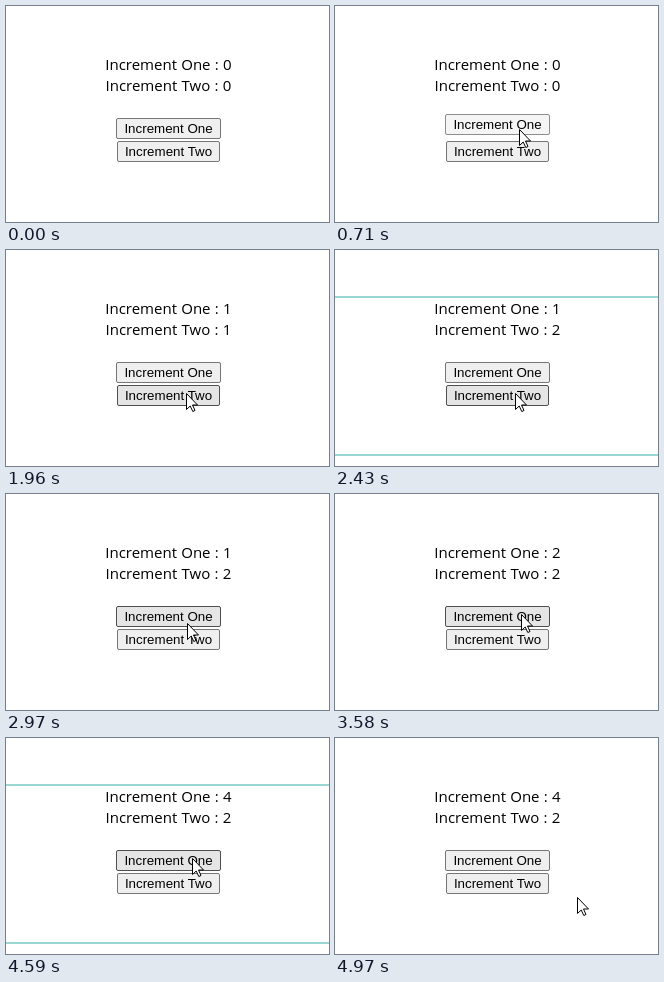
An HTML page that plays this animation: 323x216 px, repeating every 5.05 s.

```html
<!DOCTYPE html>
<html lang="en">
<head>
<meta charset="utf-8">
<title>Increment counters</title>
<style>
  html, body { margin: 0; width: 100%; height: 100%; overflow: hidden; background: #fff; }
  svg { display: block; width: 323px; height: 216px; }
  text { text-anchor: middle; fill: #000; }
  .label { font: 15px "Open Sans", "Noto Sans", sans-serif; word-spacing: .4px; }
  .button text { font: 13.333px "Liberation Sans", Arial, sans-serif; }
  .button rect { fill: #efefef; stroke: #767676; }
  .button.hover rect { fill: #e5e5e5; stroke: #4f4f4f; }
  .button.press rect { fill: #f5f5f5; stroke: #8d8d8d; }
  .button.press { transform: translateY(-4px); }
  #flash { fill: #37afa9; fill-opacity: .5; }
  #cursor { fill: #fff; stroke: #000; }
</style>
</head>
<body>
<svg viewBox="0 0 323 216">
  <text class="label" x="162.5" y="64">Increment One : 0</text>
  <text class="label" x="162.5" y="85">Increment Two : 0</text>
  <g class="button">
    <rect x="110.5" y="112.5" width="104" height="20" rx="1.5"/>
    <text x="162.5" y="127">Increment One</text>
  </g>
  <g class="button">
    <rect x="111.5" y="135.5" width="102" height="20" rx="1.5"/>
    <text x="162.5" y="150">Increment Two</text>
  </g>
  <path id="flash" d="M0 46H323V48H0ZM0 204H323V206H0Z"/>
  <path id="cursor" d="M.5 .5V16.5L4.2 13 6.8 18.5 9 17.5 6.5 12H11.5Z"/>
</svg>
<script>
const LOOP = 5050, STEP = 75, PRESS = 170, FLASH = 230;
const names = ['One', 'Two'];

// The pointer starts below the stage and glides to each stop in turn
const home = { x: 240, y: 221 };
const glides = [
  { at: 80, steps: 7, x: 184, y: 123 },
  { at: 1180, steps: 3, x: 180, y: 141 },
  { at: 1480, steps: 1, x: 180, y: 143 },
  { at: 2810, steps: 3, x: 181, y: 129 },
  { at: 3040, steps: 4, x: 186, y: 120 },
  { at: 4820, steps: 3, x: 242, y: 159 }
];

// Release times for each button
const clicks = [[780, 3350, 3960, 4590], [1730, 2430]];

const labels = document.querySelectorAll('.label');
const buttons = document.querySelectorAll('.button');
const flash = document.getElementById('flash');
const cursor = document.getElementById('cursor');

const easeOut = u => 1 - (1 - u) ** 2;
const mix = (a, b, p) => Math.round(a + (b - a) * p);

function pointer(t) {
  let pos = home;
  for (const g of glides) {
    if (t < g.at) break;
    const done = Math.floor((t - g.at) / STEP) + 1;
    const p = easeOut(Math.min(1, done / g.steps));
    pos = { x: mix(pos.x, g.x, p), y: mix(pos.y, g.y, p) };
  }
  return pos;
}

function isOver(i, { x, y }) {
  const top = 112 + 23 * i;
  return x >= 110 + i && x < 215 - i && y >= top && y < top + 21;
}

function draw(t) {
  const pos = pointer(t);
  cursor.setAttribute('transform', `translate(${pos.x} ${pos.y})`);

  names.forEach((name, i) => {
    const count = clicks[i].filter(c => c <= t).length;
    labels[i].textContent = `Increment ${name} : ${count}`;
    buttons[i].classList.toggle('hover', isOver(i, pos));
    buttons[i].classList.toggle('press', clicks[i].some(c => t >= c - PRESS && t < c));
  });

  const lit = clicks.flat().some(c => t >= c && t < c + FLASH);
  flash.setAttribute('visibility', lit ? 'visible' : 'hidden');
}

function tick() {
  draw(performance.now() % LOOP);
  requestAnimationFrame(tick);
}
tick();
</script>
</body>
</html>
```
